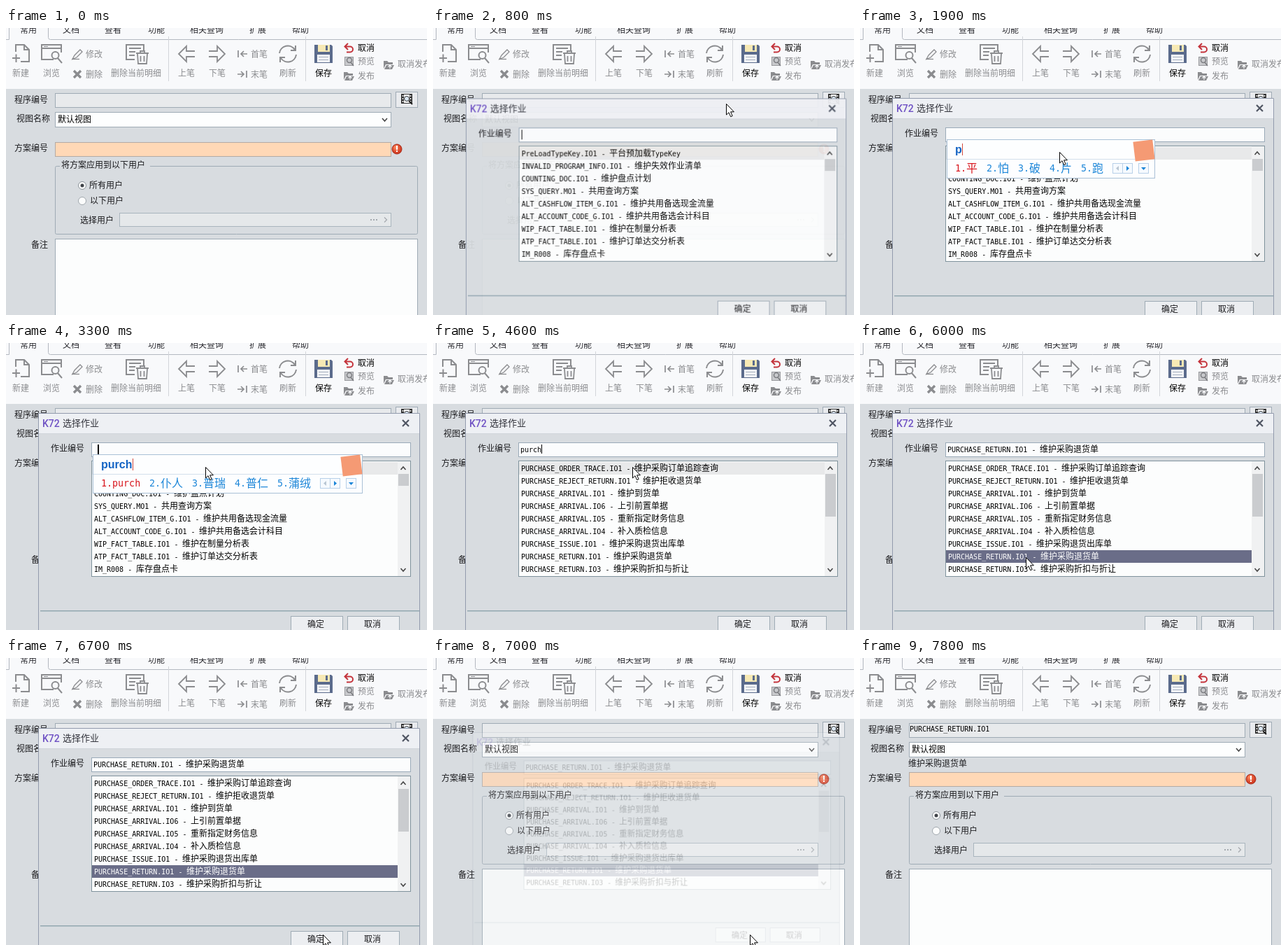
Recreate the animation shown at these times as an HTML page with a canvas. Size 602x410 px, loop 8.5 s.

```html
<!DOCTYPE html>
<html lang="zh-CN">
<head>
<meta charset="utf-8">
<style>
html, body { margin: 0; width: 100%; height: 100%; overflow: hidden; background: #d8dce0; }
canvas { display: block; }
</style>
</head>
<body>
<canvas id="stage" width="602" height="410"></canvas>
<script>
const LOOP = 8500, STEP = 100;
const UI = '"Noto Sans CJK SC", "Noto Sans CJK", sans-serif';
const MONO = '"DejaVu Sans Mono", monospace';
const GRAY = '#8b8c8f', INK = '#1c1c1f', EDGE = '#9fabb5', FORM = '#d8dce0';

const stage = document.getElementById('stage').getContext('2d');
const layerCanvas = document.createElement('canvas');
layerCanvas.width = 602;
layerCanvas.height = 420;
const layer = layerCanvas.getContext('2d');
let ctx = stage;

// ---------- drawing helpers ----------
function fill(d, color) {
  ctx.fillStyle = color;
  ctx.fill(new Path2D(d));
}
function stroke(d, color = GRAY, width = 1) {
  ctx.strokeStyle = color;
  ctx.lineWidth = width;
  ctx.stroke(new Path2D(d));
}
function rect(x, y, w, h, color) {
  ctx.fillStyle = color;
  ctx.fillRect(x, y, w, h);
}
function box(x, y, w, h, color, edge = EDGE) {
  rect(x, y, w, h, color);
  ctx.strokeStyle = edge;
  ctx.lineWidth = 1;
  ctx.strokeRect(x + .5, y + .5, w - 1, h - 1);
}
function disc(x, y, r, color, edge) {
  ctx.beginPath();
  ctx.arc(x, y, r, 0, 7);
  ctx.fillStyle = color;
  ctx.fill();
  if (edge) { ctx.strokeStyle = edge; ctx.lineWidth = 1; ctx.stroke(); }
}
// y is the vertical middle of the glyphs
function text(s, x, y, color = INK, size = 12, font = UI, weight = 400) {
  ctx.font = `${weight} ${size}px ${font}`;
  ctx.fillStyle = color;
  ctx.fillText(s, x, Math.round(y + size * .37));
}
// Fixed pitch: a Latin letter is half as wide as a Chinese one
function mixed(s, x, y, color = '#000', size = 12) {
  for (const run of s.match(/[\x00-\x7f]+|[^\x00-\x7f]+/g)) {
    const latin = run.charCodeAt(0) < 128;
    text(run, x, y, color, latin ? size / 1.2 : size, latin ? MONO : UI);
    x += run.length * (latin ? size / 2 : size);
  }
}
const chevron = (x, y, dir, color = '#444', w = 1.5) =>
  stroke(`M${x - 3.5} ${y - dir * 2}l3.5 ${dir * 4}l3.5 ${-dir * 4}`, color, w);

// ---------- ribbon ----------
const TABS = [['常用', 20], ['文档', 81], ['查看', 141], ['功能', 203], ['相关查询', 263], ['扩展', 348], ['帮助', 409]];
const COMMANDS = [
  ['新建', 9, 65], ['浏览', 53, 65], ['修改', 114, 38], ['删除', 114, 67], ['删除当前明细', 150, 65],
  ['上笔', 246, 65], ['下笔', 290, 65], ['首笔', 350, 38], ['末笔', 350, 67], ['刷新', 391, 65],
  ['保存', 442, 65, '#000'], ['取消', 503, 29, '#000'], ['预览', 503, 48], ['发布', 503, 69], ['取消发布', 560, 52]
];
function folder(x, y) {
  fill(`M${x} ${y + 1}h5l2 2h6v3h-10l-3 6z`, GRAY);
  fill(`M${x + 4} ${y + 7}h11l-3 6h-11z`, GRAY);
  stroke(`M${x + 9} ${y + 12}v-5m-2.5 2.5l2.5-2.5l2.5 2.5`, '#f8f9fb', 1.2);
}
function ribbon() {
  rect(0, 0, 602, 87, '#f8f9fb');
  stroke('M0 16.5H4.5V0M60.5 0V13.5Q60.5 16.5 63.5 16.5H602', '#b3b8c0');
  for (const [label, x] of TABS) text(label, x, 3, '#2b2b30');
  for (const [label, x, y, color = GRAY] of COMMANDS) text(label, x, y, color);
  stroke('M232.5 12V76M428.5 12V76', '#d3d5da');

  stroke('M14 34V24H26L33 31V48H21M26 24V31H33', GRAY, 2);
  stroke('M9 43H20M14.5 37.5V49', GRAY, 2);

  stroke('M68 45H51V24H79V35M51 29H79', GRAY, 2);
  stroke('M54 26.5H60', GRAY, 1);
  stroke('M75.5 39a5 5 0 1 1-10 0a5 5 0 1 1 10 0M74 43l6 7', GRAY, 2);

  stroke('M95 44.5L98 39L106 31L109 34L101 42Z', GRAY, 1.3);
  stroke('M94 44.5H105', GRAY, 1.3);
  stroke('M97 61L107 71M107 61L97 71', GRAY, 3.4);

  stroke('M184 45H172V24H197V32M176 29H193M176 34H185M176 39H184', GRAY, 2);
  stroke('M186 36H204M192 35V33H198V35M188 37L189 51H201L202 37M192.5 40V48M197.5 40V48', GRAY, 1.8);

  stroke('M270 33H258V26L247 37L258 48V41H270', GRAY, 1.8);
  stroke('M290 33H302V26L313 37L302 48V41H290', GRAY, 1.8);
  stroke('M332 32V42M345 37H336M340 33L336 37L340 41', GRAY, 1.7);
  stroke('M344 61V71M331 66H340M336 62L340 66L336 70', GRAY, 1.7);

  stroke('M391 36A12 12 0 0 1 413 31M415 38A12 12 0 0 1 393 43', GRAY, 2);
  stroke('M414 25V32H407M392 49V42H399', GRAY, 2);

  fill('M441 24H465L467 26V50H441Z', '#5b6b8c');
  rect(446, 24, 17, 10, '#f7e9b4');
  rect(457, 25, 3, 7, '#5b6b8c');
  rect(445, 38, 18, 11, '#f7f8fa');
  stroke('M447 41.5H461M447 45.5H461', '#a4adbd');

  stroke('M489 22L484.5 26.5L489 31M485 26.5H492A4 4 0 0 1 492 34.5H487', '#c4343c', 2);
  box(484, 41, 13, 13, '#c9cacd', '#97989c');
  stroke('M494.500 46a3.500 3.500 0 1 1-7 0a3.500 3.500 0 1 1 7 0M493 49l4 5', '#7d7e82', 1.6);
  folder(483, 62);
  folder(540, 46);
}

// ---------- form ----------
function form(t) {
  rect(0, 87, 602, 323, FORM);
  text('程序编号', 12, 103);
  box(70, 93, 481, 21, '#e8eaec');
  const hovered = t >= 200 && t < 700;
  box(557, 91, 32, 23, hovered ? '#eef4fa' : '#e9ebee', hovered ? '#7f9fc0' : EDGE);
  box(565, 94, 16, 14, '#fafafa', '#333');
  stroke('M567.5 95V107M578.5 95V107', '#333', 3);
  ctx.setLineDash([2, 2]);
  stroke('M567.5 96V107M578.5 96V107', '#fff', 1.5);
  ctx.setLineDash([]);
  disc(573, 101, 3.5, '#dce9f5', '#333');
  stroke('M576 104L581 109', '#222', 2);

  text('视图名称', 15, 130);
  box(70, 120, 481, 22, '#fdfefe');
  text('默认视图', 74, 131, '#000');
  chevron(541.5, 131, 1);

  text('方案编号', 12, 172);
  box(70, 163, 481, 21, '#ffd8b6', '#b3aaa5');
  const glow = ctx.createRadialGradient(557, 170, 1, 559, 173, 8);
  glow.addColorStop(0, '#ff8a60');
  glow.addColorStop(1, '#c32410');
  disc(559, 173, 7, glow, '#a8301c');
  rect(558, 168, 2, 6, '#fff');
  rect(558, 175, 2, 2, '#fff');

  stroke('M77 197.500H72.500Q70.500 197.500 70.500 199.500V292.500Q70.500 294.500 72.500 294.500H586.500Q588.500 294.500 588.500 292.500V199.500Q588.500 197.500 586.500 197.500H206', EDGE);
  text('将方案应用到以下用户', 79, 196);
  disc(109, 225, 5.500, '#fbfcfc', '#8b9299');
  disc(109, 225, 2.500, '#3e4248');
  text('所有用户', 119, 225);
  disc(109, 247, 5.500, '#fbfcfc', '#a0a7ad');
  text('以下用户', 120, 247);
  text('选择用户', 106, 275);
  box(162, 264, 389, 20, '#e5e8ea', '#a9b5be');
  for (const x of [521, 525, 529]) rect(x, 273, 2, 2, '#a4a9ae');
  stroke('M541 270.500L544.500 274L541 277.500', '#a4a9ae', 1.2);

  text('备注', 36, 310);
  box(70, 301, 519, 130, '#fcfdfd');
  if (t >= 7300) {
    mixed('PURCHASE_RETURN.IO1', 71, 101);
    text('维护采购退货单', 69, 151);
  }
}

// ---------- dialog ----------
const CHOICE = 'PURCHASE_RETURN.IO1 - 维护采购退货单';
const ALL_ROWS = [
  'PreLoadTypeKey.IO1 - 平台预加载TypeKey', 'INVALID_PROGRAM_INFO.IO1 - 维护失效作业清单',
  'COUNTING_DOC.IO1 - 维护盘点计划', 'SYS_QUERY.MO1 - 共用查询方案',
  'ALT_CASHFLOW_ITEM_G.IO1 - 维护共用备选现金流量', 'ALT_ACCOUNT_CODE_G.IO1 - 维护共用备选会计科目',
  'WIP_FACT_TABLE.IO1 - 维护在制量分析表', 'ATP_FACT_TABLE.IO1 - 维护订单达交分析表', 'IM_R008 - 库存盘点卡'
];
const FOUND_ROWS = [
  'PURCHASE_ORDER_TRACE.IO1 - 维护采购订单追踪查询', 'PURCHASE_REJECT_RETURN.IO1 - 维护拒收退货单',
  'PURCHASE_ARRIVAL.IO1 - 维护到货单', 'PURCHASE_ARRIVAL.IO6 - 上引前置单据',
  'PURCHASE_ARRIVAL.IO5 - 重新指定财务信息', 'PURCHASE_ARRIVAL.IO4 - 补入质检信息',
  'PURCHASE_ISSUE.IO1 - 维护采购退货出库单', CHOICE, 'PURCHASE_RETURN.IO3 - 维护采购折扣与折让'
];
const CARET_TOGGLES = [1900, 2300, 2600, 2800, 3000, 3300, 4100, 4600, 5100];

function dialog(t, pointerY) {
  const found = t >= 3600, chosen = t >= 5800;
  rect(46, 100, 546, 316, FORM);
  rect(46, 100, 546, 30, '#eef0f4');
  stroke('M46.500 416V100.500H591.500V416', '#929bad');
  stroke('M47 129.500H591', '#d0d5da');
  text('K72', 52, 115, '#6f52c4', 14, 'Roboto, sans-serif', 500);
  text('选择作业', 81, 114, '#33343c', 13, UI, 500);
  stroke('M567 110L576 119M576 110L567 119', '#4f5563', 2.2);

  text('作业编号', 64, 151);
  box(122, 142, 457, 21, '#fbfcfd', '#9aaab8');
  if (found) mixed(chosen ? CHOICE : 'purch', 125, 152);
  if (CARET_TOGGLES.filter(at => at <= t).length % 2 === 0) {
    if (t < 1800) rect(126, 145, 1, 14, '#000');
    else if (!found) rect(131, 145, 2, 14, '#000');
    else rect(155, 145, 1, 13, '#000');
  }

  box(122, 168, 457, 166, '#fcfdfd', '#7f929c');
  const active = chosen ? 7 : t < 5000 ? 0 : Math.floor((pointerY - 170) / 18);
  rect(123, 170 + active * 18, 437, 18, chosen ? '#6a6d88' : '#e8e9ea');
  (found ? FOUND_ROWS : ALL_ROWS).forEach((row, i) =>
    mixed(row, 126, 179 + i * 18, chosen && i === active ? '#fff' : '#000'));
  rect(560, 169, 18, 164, '#f0f1f2');
  rect(561, 187, 15, found ? 61 : 17, '#cacccf');
  chevron(568, 179, -1);
  chevron(568, 324, 1);

  stroke('M49 382.500H591', '#8fa3ac');
  stroke('M49 383.500H591', '#b9c6cc');
  for (const [label, x] of [['确定', 407], ['取消', 488]]) {
    box(x, 390, 75, 22, '#eceef1', '#9fabb5');
    text(label, x + 24, 402);
  }
}

// The dialog fades and scales around its centre
function showDialog(t, pointerY) {
  if (t < 700 || t >= 7100) return;
  const [alpha, scale] = t < 800 ? [.45, .96] : t < 900 ? [.94, .997] : t >= 7000 ? [.2, .962] : [1, 1];
  ctx = layer;
  ctx.clearRect(0, 0, 602, 420);
  dialog(t, pointerY);
  ctx = stage;
  ctx.save();
  ctx.globalAlpha = alpha;
  ctx.translate(319, 258);
  ctx.scale(scale, scale);
  ctx.drawImage(layerCanvas, -319, -258);
  ctx.restore();
}

// ---------- input method ----------
const TYPING = [
  [1800, 'p', '平怕破片跑'], [2100, 'pu', '普扑铺谱葡'],
  [2600, 'pur', ['pur', '仆人', '普瑞', '普仁', '蒲绒']],
  [3000, 'purc', ['purc', '仆人参', '普瑞', '普仁', '蒲绒']],
  [3100, 'purch', ['purch', '仆人', '普瑞', '普仁', '蒲绒']]
];
function inputMethod(t) {
  if (t < 1800 || t >= 3600) return;
  const left = 136;
  const [, typed, words] = TYPING.filter(([at]) => at <= t).pop();
  const items = [...words].map((word, i) => `${i + 1}.${word}`);
  const widthOf = s => [...s].reduce((w, c) => w + (c < '\x80' ? 8 : 16), 0);
  const end = items.reduce((x, s) => x + widthOf(s) + 13, left) - 13;

  box(124, 159, end + 74 - 124, 56, '#fdfeff', '#a9c0d6');
  stroke(`M125 187.500H${end + 73}`, '#d3e0ec');
  text(typed, left, 173, '#1464c4', 16, '"Liberation Sans", sans-serif', 700);
  rect(left + 1 + Math.floor(ctx.measureText(typed).width), 165, 1, 17, '#d04a40');
  let x = left;
  items.forEach((s, i) => {
    mixed(s, x, 200, i ? '#1c86d8' : '#d8141c', 16);
    x += widthOf(s) + 13;
  });

  for (const dx of [13, 27, 50]) box(end + dx, 193, 15, 15, '#f6faff', '#b8d0e8');
  fill(`M${end + 22} 197v7l-4-3.500z`, '#b9c6d3');
  fill(`M${end + 33} 197v7l4-3.500z`, '#1c86d8');
  fill(`M${end + 54} 199h7l-3.500 4z`, '#1c86d8');

  ctx.save();
  ctx.translate(end + 58, 175);
  ctx.rotate(-.12);
  rect(-14, -14, 28, 28, '#f59a74');
  ctx.restore();
}

// ---------- pointer ----------
const PATH = [
  [100, 596, 82], [300, 578, 104], [400, 578, 104], [500, 576, 104], [600, 576, 104], [800, 419, 108],
  [1300, 285, 177], [4900, 285, 177], [5200, 247, 271], [5500, 237, 306], [6000, 237, 306],
  [6600, 454, 393], [6700, 453, 395], [7200, 453, 395], [7800, 584, 412]
];
function pointerAt(t) {
  const next = PATH.findIndex(([at]) => at > t);
  if (next < 1) return null;
  const [t0, x0, y0] = PATH[next - 1], [t1, x1, y1] = PATH[next];
  const k = (t - t0) / (t1 - t0);
  return [Math.round(x0 + (x1 - x0) * k), Math.round(y0 + (y1 - y0) * k)];
}
function drawPointer([x, y]) {
  const arrow = `M${x + .5} ${y + .5}v15.500l3.500-3.300l2.700 6l2.500-1.100l-2.600-5.800h4.800z`;
  fill(arrow, '#fff');
  stroke(arrow, '#000');
}

function frame(now) {
  const t = Math.floor(now % LOOP / STEP) * STEP;
  const pointer = pointerAt(t);
  ribbon();
  form(t);
  showDialog(t, pointer ? pointer[1] : 0);
  inputMethod(t);
  if (pointer) drawPointer(pointer);
}
const start = performance.now();
function tick() {
  frame(performance.now() - start);
  requestAnimationFrame(tick);
}
tick();
</script>
</body>
</html>
```
